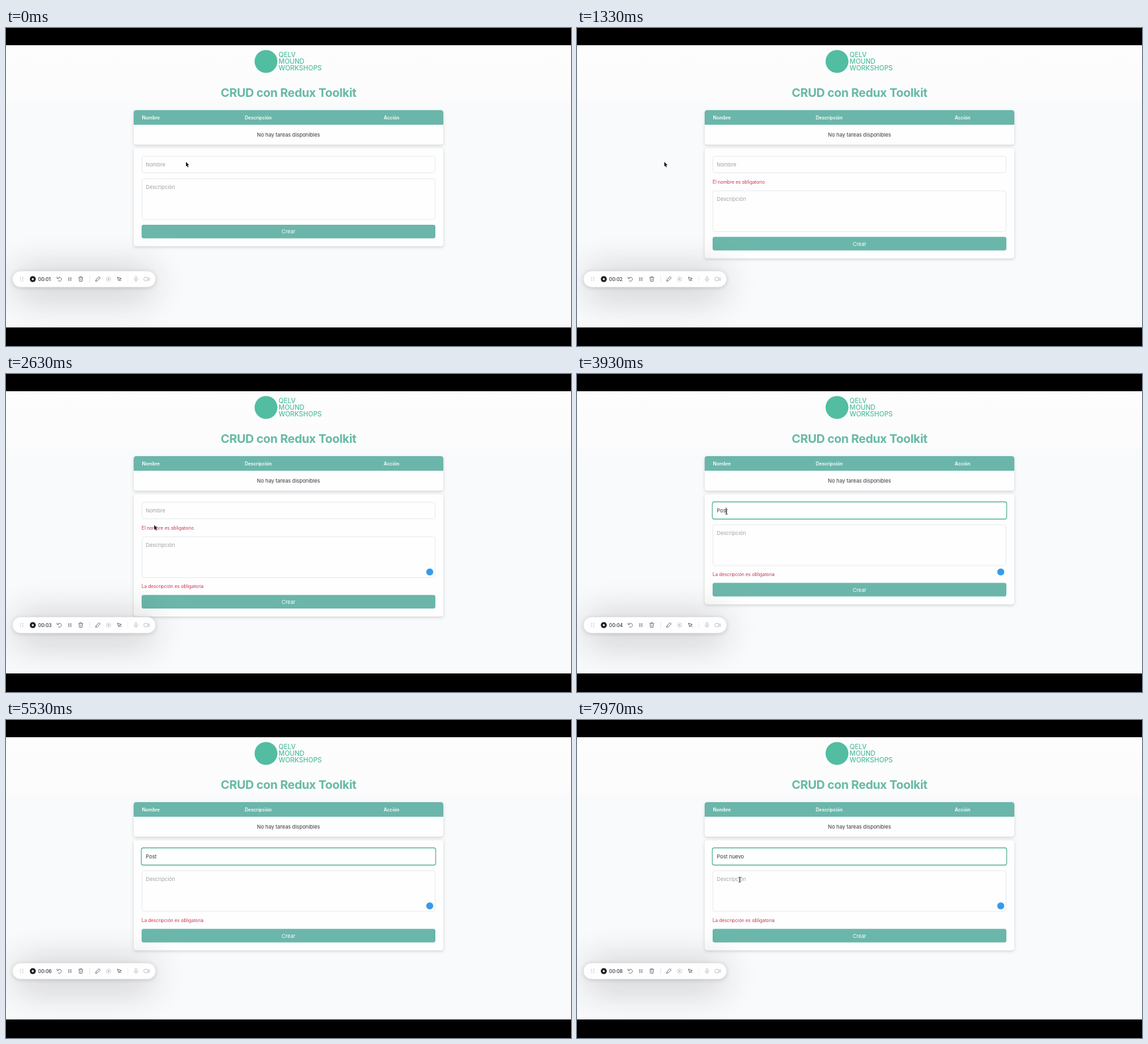
An HTML page with a canvas that plays this animation: 854x480 px, repeating every 8 s.

```html
<!DOCTYPE html>
<html lang="es">
<head>
<meta charset="utf-8">
<title>CRUD con Redux Toolkit</title>
<style>
html, body { margin: 0; width: 100%; height: 100%; overflow: hidden; background: #000; }
canvas { display: block; width: 854px; height: 480px; }
</style>
</head>
<body>
<canvas id="stage" width="854" height="480"></canvas>
<script>
const ctx = document.getElementById('stage').getContext('2d');
const LOOP = 8000;
const FONT = 'Inter, "Open Sans", sans-serif';
const TEAL = '#6bb6aa', BRAND = '#52bda0', CARD = '#fefefe', EDGE = '#e6e8eb';
const RED = '#c62f4c', HINT = '#a0a2a8', INK = '#33363f';

// Session timeline, in ms
const NAME_FOCUS = 500, NAME_BLUR = 1130, DESC_FOCUS = 1850, DESC_BLUR = 2320, NAME_AGAIN = 2900;
const BADGE_ON = 1920, BADGE_MOVE = 4100, HIDE_POINTER = 4150, SHOW_POINTER = 7550;
const RECORDED = 1010;
const ENTRY = 'Post nuevo';
const KEYS = [3550, 3700, 3850, 4000, 5700, 5950, 6150, 6400, 6700, 7000];
const PATH = [
  [0, 272, 202], [100, 272, 202], [400, 262, 205.5], [750, 262, 205.5],
  [1120, 132, 202], [1420, 132, 202], [1800, 236, 262], [1980, 236, 262],
  [2280, 150, 236], [2380, 150, 236], [2630, 224, 228], [2860, 226, 208],
  [7550, 226, 208], [7850, 246, 241], [8000, 246, 241]
];

function box(x, y, w, h, r, fill, stroke, width = 1) {
  ctx.beginPath();
  ctx.roundRect(x, y, w, h, r);
  if (fill) { ctx.fillStyle = fill; ctx.fill(); }
  if (stroke) { ctx.strokeStyle = stroke; ctx.lineWidth = width; ctx.stroke(); }
}

function disc(x, y, r, fill) {
  ctx.beginPath();
  ctx.arc(x, y, r, 0, Math.PI * 2);
  ctx.fillStyle = fill;
  ctx.fill();
}

function text(str, x, y, size, color, weight = 400, align = 'left', spacing = 0) {
  ctx.font = `${weight} ${size}px ${FONT}`;
  ctx.letterSpacing = spacing + 'px';
  ctx.textAlign = align;
  ctx.fillStyle = color;
  ctx.fillText(str, x, y);
}

function line(points, color, width = 1) {
  ctx.beginPath();
  points.forEach(([x, y], i) => i ? ctx.lineTo(x, y) : ctx.moveTo(x, y));
  ctx.strokeStyle = color;
  ctx.lineWidth = width;
  ctx.stroke();
}

// Only the shadow lands on the stage; the caster stays off to the left
function shadow(x, y, w, h, r, color, blur) {
  ctx.save();
  ctx.shadowColor = color;
  ctx.shadowBlur = blur;
  ctx.shadowOffsetX = 2000;
  box(x - 2000, y, w, h, r, '#000');
  ctx.restore();
}

function card(x, y, w, h) {
  shadow(x, y + 1.5, w, h, 4, 'rgba(0,0,0,.16)', 4);
  box(x, y, w, h, 4, CARD);
}

function pointerAt(t) {
  const i = Math.max(1, PATH.findIndex(p => p[0] > t));
  const [t0, x0, y0] = PATH[i - 1], [t1, x1, y1] = PATH[i];
  const k = (t - t0) / (t1 - t0), e = k * k * (3 - 2 * k);
  return [x0 + (x1 - x0) * e, y0 + (y1 - y0) * e];
}

function drawPage() {
  const bg = ctx.createLinearGradient(0, 26, 0, 452);
  bg.addColorStop(0, '#fdfdfd');
  bg.addColorStop(0.19, '#fcfcfd');
  bg.addColorStop(0.21, '#f9fafb');
  ctx.fillStyle = bg;
  ctx.fillRect(0, 26, 854, 426);

  disc(393, 50.5, 17.3, BRAND);
  ['QELV', 'MOUND', 'WORKSHOPS'].forEach((s, i) => text(s, 412, 44 + i * 10.2, 10, BRAND, 500));
  text('CRUD con Redux Toolkit', 427, 103.8, 18, '#66b9a4', 700, 'center', -0.3);

  card(193, 124, 468, 52);
  box(193, 124, 468, 22, [4, 4, 0, 0], TEAL);
  text('Nombre', 205.5, 137.5, 7, '#fff', 600);
  text('Descripción', 361, 137.5, 7, '#fff', 600);
  text('Acción', 571, 137.5, 7, '#fff', 600);
  text('No hay tareas disponibles', 427, 163.6, 7.8, INK, 400, 'center');
}

function field(y, h, focused) {
  if (focused) box(204.5, y - 0.5, 445, h + 1, 3, CARD, '#63b8a0', 1.3);
  else box(205.5, y, 443, h, 3, CARD, EDGE, 0.9);
}

function caret(x, y, since) {
  if (since % 1000 < 500) line([[x, y - 4.5], [x, y + 4.5]], INK, 0.8);
}

function drawForm(t) {
  const typed = KEYS.filter(k => k <= t).length;
  const value = ENTRY.slice(0, typed);
  const nameErr = t >= NAME_BLUR && !typed;
  const descErr = t >= DESC_BLUR;
  const nameFocus = (t >= NAME_FOCUS && t < NAME_BLUR) || t >= NAME_AGAIN;
  const descFocus = t >= DESC_FOCUS && t < DESC_BLUR;
  const areaY = 227.5 + (nameErr ? 18.3 : 0);
  const buttonY = areaY + 69.5 + (descErr ? 18.3 : 0);

  card(193, 181.5, 468, buttonY + 32.5 - 181.5);
  field(193.5, 25, nameFocus);
  text(value || 'Nombre', 211.3, 209, 7.8, value ? INK : HINT);
  if (nameFocus) {
    const start = t < NAME_BLUR ? NAME_FOCUS : typed ? KEYS[typed - 1] : NAME_AGAIN;
    caret(211.6 + ctx.measureText(value).width, 206, t - start);
  }
  if (nameErr) text('El nombre es obligatorio', 205, 234.6, 6.9, RED);

  field(areaY, 61.5, descFocus);
  text('Descripción', 211.3, areaY + 15.4, 7.8, HINT);
  if (descFocus) caret(211.6, areaY + 12.5, t - DESC_FOCUS);
  if (descErr) text('La descripción es obligatoria', 205, areaY + 77.3, 6.9, RED);

  box(205, buttonY, 444, 20.5, 3, TEAL);
  text('Crear', 427, buttonY + 13.2, 7.8, '#fff', 400, 'center');
  if (t >= BADGE_ON) disc(640.5, t < BADGE_MOVE ? 298.8 : 280.5, 5.3, '#369aea');
  return areaY;
}

function drawRecorder(t) {
  const dark = '#707078', pale = '#b6b6bc', y = 379;
  shadow(10, 361, 216, 50, 25, 'rgba(30,30,45,.19)', 52);
  shadow(10, 368, 216, 24, 12, 'rgba(30,30,45,.2)', 6);
  box(10, 367, 216, 24, 12, '#fefefe', '#ededf0', 0.6);

  for (let i = 0; i < 6; i++) disc(22 + (i % 2) * 3.4, y - 2.6 + (i >> 1) * 2.6, 0.7, pale);
  disc(40.5, y, 4.5, '#202024');
  disc(40.5, y, 1.5, '#fefefe');
  text('00:0' + Math.floor((t + RECORDED) / 1000), 48.5, 381.6, 7.2, INK, 500);

  // restart
  ctx.beginPath();
  ctx.arc(80.8, y + 0.2, 3, -2.7, 2.5);
  ctx.strokeStyle = dark; ctx.lineWidth = 0.9; ctx.stroke();
  line([[77, 375.5], [77.4, 378.4], [80, 378]], dark, 0.9);
  // pause
  for (const x of [95, 98]) line([[x, 376], [x, 382]], dark, 1.1);
  // bin
  line([[109.6, 376.7], [116.4, 376.7]], dark, 0.9);
  line([[111.6, 376.5], [111.6, 375.2], [114.4, 375.2], [114.4, 376.5]], dark, 0.8);
  line([[110.5, 377], [111, 382.4], [115, 382.4], [115.5, 377]], dark, 0.9);
  line([[113, 378.3], [113, 381]], dark, 0.8);
  line([[126.5, 374], [126.5, 384]], '#e2e2e6', 0.8);
  // pencil
  ctx.beginPath();
  ctx.moveTo(135.5, 382.3); ctx.lineTo(136.2, 379.8); ctx.lineTo(140.6, 375.4);
  ctx.lineTo(142.4, 377.2); ctx.lineTo(138, 381.6); ctx.closePath();
  ctx.strokeStyle = dark; ctx.lineWidth = 1; ctx.stroke();
  // blur dots
  for (let i = 0; i < 8; i++) {
    const a = i * Math.PI / 4;
    disc(155 + 3.2 * Math.cos(a), y + 3.2 * Math.sin(a), 0.7, pale);
  }
  disc(155, y, 1.3, pale);
  // click highlight
  ctx.beginPath();
  ctx.moveTo(168.3, 376); ctx.lineTo(174.3, 378.2); ctx.lineTo(171.8, 379.4);
  ctx.lineTo(170.6, 382); ctx.closePath();
  ctx.strokeStyle = dark; ctx.lineWidth = 1; ctx.stroke();
  line([[172, 379.6], [174.2, 382]], dark, 1);
  line([[184, 374], [184, 384]], '#eeeef1', 0.8);
  // microphone
  box(195.2, 375, 2.6, 4.6, 1.3, null, pale, 0.8);
  ctx.beginPath();
  ctx.arc(196.5, 378.6, 2.8, 0, Math.PI);
  ctx.stroke();
  line([[196.5, 381.4], [196.5, 383]], pale, 0.8);
  // camera
  box(208.6, 376.4, 5.4, 5.2, 1, null, pale, 0.8);
  line([[214.2, 378.4], [216.6, 376.9], [216.6, 381.1], [214.2, 379.6]], pale, 0.8);
}

function drawPointer(t, areaY) {
  if (t >= HIDE_POINTER && t < SHOW_POINTER) return;
  const [x, y] = pointerAt(t);
  const inside = (top, h) => x > 205 && x < 649 && y > top && y < top + h;
  if (t > 120 && (inside(193.5, 25.5) || inside(areaY, 61.5))) {
    line([[x, y - 3.5], [x, y + 3.5]], '#4a4a4e', 1.2);
    for (const d of [-3.6, 3.6]) line([[x - 1.8, y + d], [x + 1.8, y + d]], '#4a4a4e', 0.9);
    return;
  }
  ctx.beginPath();
  [[0, 0], [0, 7], [1.5, 5.7], [2.6, 8.3], [3.8, 7.8], [2.7, 5.3], [4.8, 5.1]]
    .forEach(([dx, dy]) => ctx.lineTo(x + dx, y + dy));
  ctx.closePath();
  ctx.strokeStyle = '#fff';
  ctx.lineWidth = 1;
  ctx.stroke();
  ctx.fillStyle = '#18181a';
  ctx.fill();
}

const begin = performance.now();

function frame(now) {
  const t = Math.max(0, now - begin) % LOOP;
  ctx.fillStyle = '#000';
  ctx.fillRect(0, 0, 854, 480);
  ctx.save();
  ctx.beginPath();
  ctx.rect(0, 26, 854, 426);
  ctx.clip();
  drawPage();
  const areaY = drawForm(t);
  drawRecorder(t);
  drawPointer(t, areaY);
  ctx.restore();
  requestAnimationFrame(frame);
}
requestAnimationFrame(frame);
</script>
</body>
</html>
```
